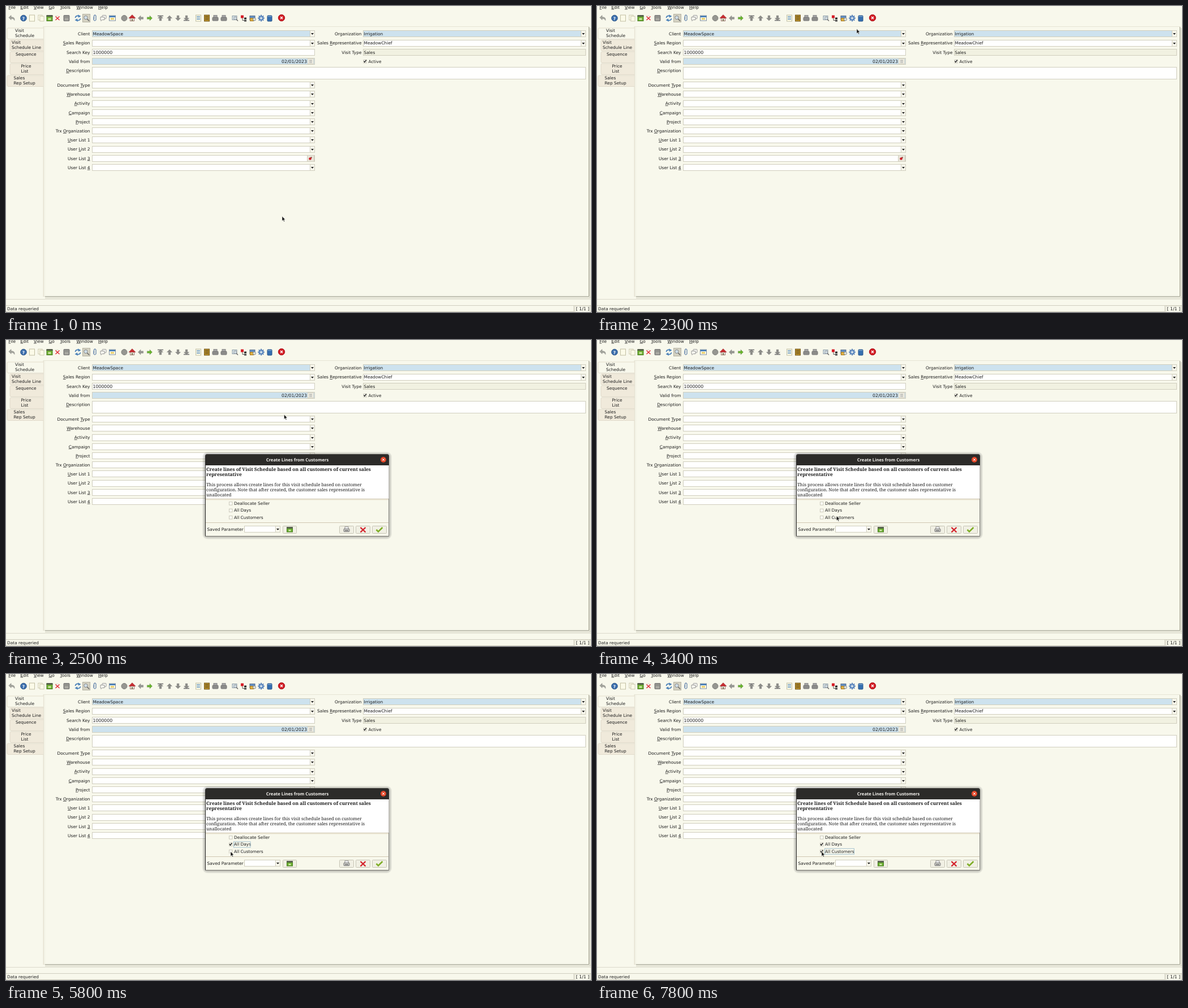
Recreate the animation shown at these times as an HTML page. Size 1034x542 px, loop 8000 ms.

```html
<!DOCTYPE html>
<html lang="en">
<head>
<meta charset="utf-8">
<title>Visit Schedule</title>
<style>
html, body { margin: 0; width: 100%; height: 100%; overflow: hidden; background: #f8f8ec; }
svg { display: block; width: 100%; height: 100%; }
text { font: 7.45px "DejaVu Sans", sans-serif; fill: #1c1c1c; text-rendering: geometricPrecision; white-space: pre; }
.u { text-decoration: underline; text-decoration-thickness: .6px; }
.num { font-size: 7.8px; }
.title { font: bold 7.65px "Noto Sans", sans-serif; fill: #f4f2ee; }
.serif { font: 7.95px "Noto Serif", serif; }
.head { font: bold 8.4px "Noto Serif", serif; }
</style>
</head>
<body>
<svg id="stage" viewBox="0 0 1034 542"></svg>
<script>
const CREAM = '#f8f8ec', EDGE = '#d0cebe', BLUE = '#cde2ee', GRAY = '#8c8c88';

const rect = (x, y, w, h, fill, stroke = 'none', extra = '') =>
  `<rect x="${x}" y="${y}" width="${w}" height="${h}" fill="${fill}" stroke="${stroke}" ${extra}/>`;
const path = (d, fill, stroke = 'none', width = 1) =>
  `<path d="${d}" fill="${fill}" stroke="${stroke}" stroke-width="${width}"/>`;
const dot = (x, y, r, fill, stroke = 'none') =>
  `<circle cx="${x}" cy="${y}" r="${r}" fill="${fill}" stroke="${stroke}"/>`;
// An underscore marks the letter that is underlined.
const text = (x, y, s, cls = '', anchor = 'start') =>
  `<text x="${x}" y="${y}" class="${cls}" text-anchor="${anchor}">${s.replace(/_(.)/, '<tspan class="u">$1</tspan>')}</text>`;
const group = (id, body) => `<g id="${id}">${body}</g>`;
const at = (x, y, body, more = '') => `<g transform="translate(${x} ${y}) ${more}">${body}</g>`;

const label = (x, y, s) => text(x, y + 2.7, s, '', 'end');
const field = (x, y, w, fill = '#fffffe') => rect(x + .5, y - 5.5, w - 1, 11, fill, EDGE);
const arrowButton = (x, y) => rect(x + .5, y - 5.5, 8, 11, '#f8f7ec', EDGE) +
  path(`M${x + 2} ${y - 1}h5l-2.5 3z`, '#222');
const combo = (x, y, w, fill) => field(x, y, w, fill) + arrowButton(x + w - 9, y);
const tick = (x, y) => path(`M${x - 2} ${y - .5}l1.5 2.2l2.7 -4`, 'none', '#151515', 1.3);
const checkbox = (x, y) => rect(x - 2.5, y - 2.5, 5.5, 5.5, '#fdfdf5', '#c6c4b6', 'stroke-width=".9"');

function tabs() {
  const list = [[2, 39, 'Visit', 16, 'Schedule', 16], [7, 60, 'Visit', 10, 'Schedule Line', 10],
    [7, 81, 'Sequence', 17, '', 0], [7, 102, 'Price', 26.5, 'List', 26.5],
    [2, 123, 'Sales', 13.5, 'Rep Setup', 13.5]];
  return list.map(([x, y, a, ax, b, bx], i) =>
    path(`M66 ${y}H${x + 2}Q${x} ${y} ${x} ${y + 2}V${y + 17}Q${x} ${y + 19.5} ${x + 2} ${y + 19.5}H66`,
      i ? '#f0eadb' : CREAM, '#dfd9c9', .9) +
    text(ax, y + 7, a) + text(bx, y + 16.2, b)).join('');
}

function icons() {
  const arrow = (color, turn, bar = '') =>
    `<g transform="rotate(${turn}) scale(.92)">${path('M-5 0L0 -5V-2H5V2H0V5Z', color, '#777', .4)}${bar}</g>`;
  const page = rect(-4.5, -5.5, 9, 11, '#fbfae8', '#c3c0a4');
  const stop = rect(-5.3, -5.5, 1.8, 11, '#777');
  const lines = c => path('M-3 -3h6M-3 -.5h6M-3 2h6', 'none', c, 1);
  const printer = rect(-3, -5, 6, 4, '#aaa', '#888') + rect(-5, -1.5, 10, 6, '#8c8c8a', '#777', 'rx="1"');
  const cross = path('M-3.5 -3L3.5 3.5M3.5 -3L-3.5 3.5', 'none', '#e02a32', 1.4);
  const lens = dot(-1, -1, 3.2, '#cfdde6', '#888') + path('M1.5 1.5L5 5', 'none', '#666', 1.6);
  const spokes = [0, 45, 90, 135].map(a =>
    `<rect x="-1" y="-5.8" width="2" height="11.6" fill="#4b78b4" transform="rotate(${a})"/>`).join('');
  const sweep = path('M-4.5 -.5Q-4 -4.5 1 -4', 'none', '#4a80b8', 1.8) + path('M0 -6.2L5.5 -3.5L1 -.8Z', '#4a80b8');
  const set = [
    [10, path('M5 4Q6 -2 -1 -2V-5L-5 -1L-1 3V1Q3 0 5 4Z', '#a4a59c', '#777', .5)],
    [31, dot(0, 0, 5.3, '#3d70ae', '#2d5587') + '<text y="3" text-anchor="middle" style="font-weight:bold;fill:#fff">?</text>'],
    [46, page],
    [62, at(-1.5, -1, page, 'scale(.8)') + at(1.5, 1, page, 'scale(.8)')],
    [77, rect(-5, -4, 10, 9, '#6cae2e', '#477b22') + rect(-5.5, -5.5, 11, 3, '#55604a') + rect(-2.5, 0, 5, 3, '#cfe6a9')],
    [92, at(-1, 0, path('M-4 -4h6', 'none', '#ddc', 1) + cross)],
    [107, rect(-5, -5, 10, 10, '#92928d', '#777', 'rx="1"') + rect(-3, 0, 6, 4, '#aaa9a2')],
    [127, sweep + `<g transform="rotate(180)">${sweep}</g>`],
    [142, rect(-6.5, -7, 13, 14, '#d5d2c2', '#b5b2a3') + lens],
    [157, path('M-2 -2V3Q0 6 2 3V-4Q0 -7 -1.5 -4V2', 'none', '#6585ad', 1.3)],
    [172, rect(-2, -5, 7, 6, '#f7f7f2', '#999', 'rx="1"') + path('M-5 -2h7v5h-4l-2 2v-2h-1z', '#f6f6ee', '#999')],
    [188, rect(-5.5, -4.5, 11, 9, '#fffbe7', '#7d8da0') + rect(-5, -4, 10, 2.5, '#3f78b5') + rect(-3, 0, 6, 2.5, '#e6c75a')],
    [209, dot(0, 0, 5, '#969691', '#7f7f7b')],
    [223, rect(-3.5, -.5, 7, 5.5, '#eee9df', '#9a7770') + path('M-6 0L0 -6L6 0Z', '#c82c30', '#8c1e22', .5) + rect(-1, 1.5, 2, 3.5, '#775')],
    [238, arrow('#969692', 0)], [254, arrow('#68b52c', 180)],
    [273, arrow(GRAY, 90, stop)], [289, arrow(GRAY, 90)], [304, arrow(GRAY, 270)], [319, arrow(GRAY, 270, stop)],
    [340, page + lines('#4780b7')],
    [355, rect(-4.5, -5.5, 9, 11, '#b28a28', '#765b1d') + lines('#65501f')],
    [370, printer], [385, printer],
    [405, rect(-5, -4, 8, 7, '#d8e3e9', '#8b9ba6') + at(1, 1, lens, 'scale(.8)')],
    [420, rect(-5, -5, 5, 5, '#d61e27') + rect(1, -1, 4, 3, '#262626') + rect(1, 3, 4, 3, '#4b4b4b') + path('M-2 0V4H1', 'none', '#333', .8)],
    [436, rect(-5, -4, 9, 7, '#6693c7', '#536b89') + rect(-4.5, 0, 6, 5, '#dfb13f', '#a67924') + dot(3, 2, 2.5, '#e9e4d4', '#789')],
    [451, spokes + dot(0, 0, 3.8, '#7ba1ce', '#4b78b4') + dot(0, 0, 1.5, '#f3f4ef')],
    [466, rect(-4, -4.5, 8, 10, '#356fb0', '#28558a', 'rx="1"') + path('M-3.5 -3h7', 'none', '#8eb2d7')],
    [487, dot(0, -.5, 5.7, '#d41d25', '#a9161d') + path('M-2 -2.5l4 4m0 -4l-4 4', 'none', '#fff', 1.5)]
  ];
  return set.map(([x, body]) => at(x, 21.5, body)).join('');
}

function form() {
  const rows = ['Client', '_Sales Region', 'Search Key', 'Valid from'];
  const lower = ['Document _Type', '_Warehouse', '_Activity', '_Campaign', '_Project', 'Trx _Organization',
    '_User List 1', 'User _List 2', 'User List _3', 'User List _4'];
  let s = rows.map((name, i) => label(148.5, 49.4 + 16.2 * i, name)).join('');
  s += combo(152, 49, 394, BLUE) + text(153.5, 52, 'MeadowSpace');
  s += combo(152, 66, 394) + field(152, 82, 394) + text(153.5, 84.6, '1000000', 'num');
  s += field(152, 98, 394, BLUE) + text(532, 100.9, '02/01/2023', 'num', 'end');
  s += rect(533.5, 93.5, 10, 9, '#efeee4', '#d6d4c6') + rect(536, 95.5, 5, 5.5, '#b8b8b0') + path('M536 97.5h5M536 99.5h5', 'none', '#fff', .6);
  s += label(148.5, 114.4, '_Description') + rect(152.5, 108.5, 872, 21, '#fffffe', EDGE);
  lower.forEach((name, i) => {
    const y = 140.2 + 16.2 * i, row = Math.round(y);
    s += label(148.5, y, name);
    s += i == 8
      ? field(152, row, 394) + rect(532.5, row - 5.5, 12, 11, '#e9e6da', EDGE) + dot(537.5, row + .5, 2.3, '#cf2029') + dot(539.5, row - 1.5, 1.2, '#8a3b2e')
      : combo(152, row, 394);
  });
  s += label(628.5, 49.4, 'Organization') + combo(631, 49, 394, BLUE) + text(632.5, 52, 'Irrigation');
  s += label(628.5, 65.6, 'Sales _Representative') + combo(631, 66, 394) + text(632.5, 68.3, 'MeadowChief');
  s += label(628.5, 81.8, 'Visit Type') + field(631, 82, 394, '#f1f1e1') + text(632.5, 84.6, 'Sales');
  return s + checkbox(634.5, 98) + tick(634.5, 98) + text(640.5, 101, 'Active');
}

function frame() {
  const menus = [[4.5, '_File'], [25.5, '_Edit'], [49, '_View'], [75.5, '_Go'], [95.5, '_Tools'], [124.5, '_Window'], [163, '_Help']];
  return rect(0, 0, 1034, 542, CREAM) + menus.map(([x, s]) => text(x, 4.5, s)).join('') + icons() +
    path('M69 517H1032.5V39', 'none', '#dddccd', 2) +
    rect(66, 36.5, 964, 478, CREAM, '#e6e4d5') +
    path('M69 514.5H1030.5V37', 'none', '#9a9989') +
    path('M66.5 37V514', 'none', '#e3dece') + path('M68.5 37V514', 'none', '#eeede0') +
    tabs() +
    path('M0 519.5H1034', 'none', '#dcdacb') + path('M0 530.5H1034', 'none', '#d0cebf') +
    path('M0 541.5H1003.5V531', 'none', '#d0cebf') + path('M1005.5 542V531H1032.5V542', 'none', '#d0cebf') +
    text(2, 539.3, 'Data requeried') + text(1007.5, 539.3, '[ 1/1 ]', 'num') + form();
}

function dialog() {
  const button = (x, w, body) => rect(x + .5, 329.5, w, 13, '#f1f0e4', '#c6c4b5', 'rx="1"') + at(x + w / 2 + .5, 336, body);
  const shadow = [5, 4, 3, 2, 1].map(n =>
    rect(352 - n, 203 - n, 325 + 2 * n, 145 + 2 * n, '#000', 'none', `rx="${4 + n}" opacity=".05"`)).join('');
  let s = shadow + path('M352 347.5V206Q352 202 356 202H673Q677 202 677 206V347.5Z', '#2c2b29');
  s += path('M354 203.5Q355 202.5 357 202.5H672Q674 202.5 675 203.5', 'none', '#55534f', .8);
  s += text(515, 215, 'Create Lines from Customers', 'title', 'middle');
  s += dot(667, 212, 5, '#e3482a') + path('M665 210l4 4m0 -4l-4 4', 'none', '#fff', 1);
  s += rect(353, 222, 323.5, 125, CREAM) + rect(353, 222, 323.5, 59, '#fff');
  s += path('M353 281.5H676M353 323.5H676', 'none', '#d0c7b1') + path('M353 283H676', 'none', '#e6ddc9');
  s += text(354, 231.7, 'Create lines of Visit Schedule based on all customers of current sales', 'head');
  s += text(354, 241.2, 'representative', 'head');
  s += ['This process allows create lines for this visit schedule based on customer',
    'configuration. Note that after created, the customer sales representative is',
    'unallocated'].map((line, i) => text(354, 258.8 + 9.15 * i, line, 'serif')).join('');
  s += ['Deallocate Seller', 'All Days', 'All Customers'].map((name, i) =>
    checkbox(397, 289.3 + 12.4 * i) + text(403, 292 + 12.4 * i, name)).join('');
  s += text(355.5, 338, 'Saved Parameter') + combo(421, 335, 64);
  s += button(489, 24, rect(-5, -3, 10, 7, '#69ae2e', '#477b22') + rect(-5.5, -5, 11, 3, '#56614b') + rect(-2, 0, 4, 2.5, '#d2e8ad'));
  s += button(589, 25, rect(-3, -5, 6, 4, '#fff', '#888') + rect(-5, -1.5, 10, 5, '#c8c8c4', '#777', 'rx="1"') + path('M-3 1.5h6', 'none', '#555'));
  s += button(618, 25, path('M-4.5 -4L4.5 4.5M4.5 -4L-4.5 4.5', 'none', '#d3222b', 2.4));
  return s + button(647, 25, path('M-5.5 0L-2 3.5L5.5 -4', 'none', '#7fae27', 2.6));
}

const pressed = y => rect(394, y - 3, 6.5, 6.5, '#aaa99d', '#98978b', 'stroke-width=".6"');
const focus = (y, w) => rect(402.5, y - 5, w, 10, 'none', '#9bbccc', 'stroke-width=".9"');

// Overlays in stacking order: id, first and last moment of visibility, drawing.
const parts = [
  ['hover', 1000, 1700, rect(444.5, 14.5, 14, 14, '#d9e6ee', '#c3ccce', 'fill-opacity=".15"')],
  ['menu', 1300, 2300, rect(443.5, 29.5, 142, 15, '#fdfdf6', '#d5d3c5')],
  ['choice', 1700, 2300, rect(444, 30, 141, 14, '#c9dce9')],
  ['item', 1300, 2300, text(458, 39.8, 'Create Lines from Customers')],
  ['dialog', 2400, 8000, dialog()],
  ['pressDays', 4300, 4700, pressed(301.7)],
  ['tickDays', 4700, 8000, tick(397, 301.7)],
  ['focusDays', 4700, 7500, focus(302, 29.5)],
  ['tip', 6600, 7500, rect(397.5, 325.5, 67, 10, '#fcfbe4', '#a7a593') + text(431, 333.2, 'All Customers', '', 'middle')],
  ['pressAll', 7500, 7800, pressed(314.1)],
  ['tickAll', 7800, 8000, tick(397, 314.1)],
  ['focusAll', 7500, 8000, focus(314.2, 52)]
];

// Pointer path: time, x, y.
const route = [[0, 488, 372.5], [400, 488, 372.5], [600, 482, 325], [800, 467, 185], [1000, 454, 50], [1200, 453, 22],
  [1800, 453, 22], [1900, 459, 40.5], [2300, 459, 40.5], [2500, 491.5, 132], [2600, 491.5, 132], [2800, 511, 284],
  [2900, 511, 284], [3200, 470, 301], [3500, 400, 317], [3600, 385, 314], [3800, 411, 305], [3900, 411, 305],
  [4100, 397.5, 304], [5000, 397.5, 304], [5200, 409, 299], [5400, 404, 306], [5600, 398, 312], [5700, 398, 312],
  [5800, 397, 314.5], [8000, 397, 314.5]];

const stage = document.getElementById('stage');
stage.innerHTML = frame() + parts.map(([id, , , body]) => group(id, body)).join('') +
  group('pointer', path('M0 0V8.2L1.9 6.5L3.2 9.5L4.5 8.9L3.2 6H5.7Z', '#151515', '#fbfbf4', .5));
const nodes = parts.map(([id]) => document.getElementById(id));
const pointer = document.getElementById('pointer');

function draw() {
  const t = Math.floor(performance.now() % 8000 / 100) * 100;
  parts.forEach(([, from, to], i) => nodes[i].style.display = t >= from && t < to ? '' : 'none');
  const i = route.findIndex(p => p[0] > t);
  const [t0, x0, y0] = route[i - 1], [t1, x1, y1] = route[i];
  const k = (t - t0) / (t1 - t0);
  pointer.setAttribute('transform', `translate(${x0 + (x1 - x0) * k} ${y0 + (y1 - y0) * k})`);
  requestAnimationFrame(draw);
}
draw();
</script>
</body>
</html>
```
